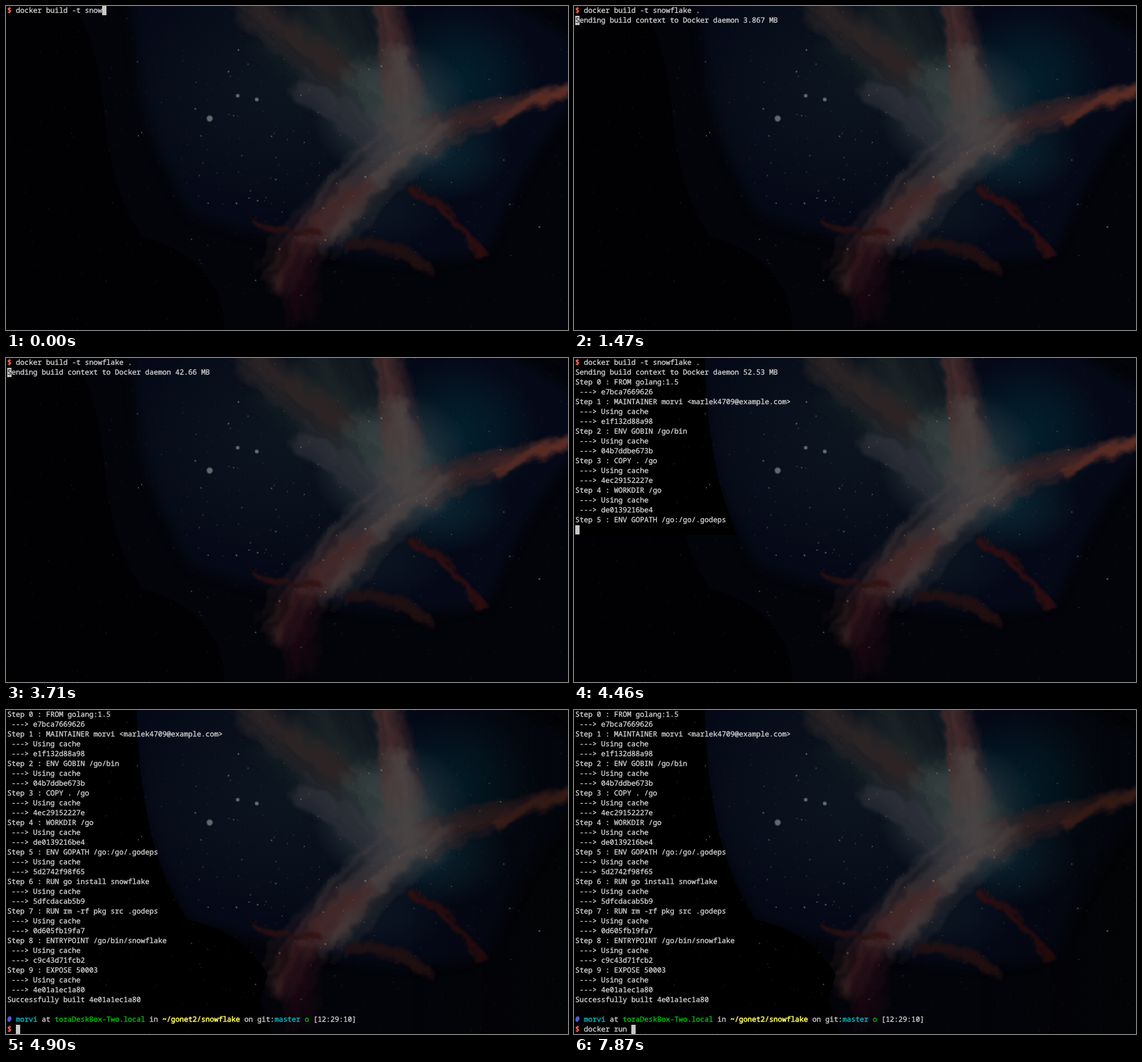
Write an HTML page that moves like this. It is 912 px wide and 527 px high and loops after 8000 ms.

```html
<!DOCTYPE html>
<html lang="en">
<head>
<meta charset="utf-8">
<title>Terminal build</title>
<style>
html, body { margin: 0; width: 100%; height: 100%; overflow: hidden; background: #000; }
svg { display: block; width: 100vw; height: 100vh; }
text {
  font: 11.6667px "Noto Sans Mono", "DejaVu Sans Mono", monospace;
  white-space: pre; text-rendering: geometricPrecision; color: #d2d2d2;
}
tspan { fill: currentColor; stroke: currentColor; stroke-width: .35px; }
.red { color: #ff6a58; }
.blue { color: #6c71ff; }
.cyan { color: #00c5cc; }
.green { color: #00c40c; }
.yellow { color: #fffb67; }
.red, .blue, .yellow { stroke-width: .6px; }
.under { color: #333; }
</style>
</head>
<body>
<svg viewBox="0 0 912 527" preserveAspectRatio="none">
  <defs>
    <filter id="soft" filterUnits="userSpaceOnUse" x="-60" y="-60" width="1032" height="647" color-interpolation-filters="sRGB">
      <feGaussianBlur stdDeviation="9"/>
    </filter>
    <filter id="cloud" filterUnits="userSpaceOnUse" x="-60" y="-60" width="1032" height="647" color-interpolation-filters="sRGB">
      <feGaussianBlur stdDeviation="2" result="blur"/>
      <feTurbulence type="fractalNoise" baseFrequency=".03" numOctaves="4" seed="4"/>
      <feDisplacementMap in="blur" scale="24" xChannelSelector="R" yChannelSelector="G"/>
    </filter>
    <linearGradient id="fade" gradientUnits="userSpaceOnUse" x1="660" x2="860">
      <stop stop-color="#030302" stop-opacity="0"/>
      <stop offset="1" stop-color="#030302" stop-opacity=".45"/>
    </linearGradient>
    <clipPath id="redrawn"><rect id="redrawnBox" width="912" height="0"/></clipPath>
  </defs>

  <rect width="912" height="527" fill="#010103"/>
  <path fill="#030409" d="M110,0 Q150,60 160,180 T220,375 Q350,410 355,527 H912 V0Z"/>
  <path fill="#050917" filter="url(#soft)" d="M202,-30 Q210,200 300,340 Q400,370 520,400 T780,400 Q850,230 930,150 V60 L780,-30Z"/>
  <g id="glows"></g>
  <g id="nebula" filter="url(#cloud)" fill="none" stroke-linecap="round"></g>
  <path clip-path="url(#redrawn)" fill="#000" opacity=".85" d="M0,0 H212 Q218,230 295,342 Q380,355 425,430 L412,470 L430,527 H0Z"/>
  <rect id="shade" x="660" width="252" height="527" fill="url(#fade)"/>
  <g id="stars"></g>
  <rect id="cursor" width="7" height="15" fill="#c8c8c8"/>
  <g id="screen"></g>
</svg>
<script>
const NS = "http://www.w3.org/2000/svg";
const LOOP = 8000, CELL = 7, ROW = 16, LEFT = 2;
const $ = id => document.getElementById(id);

let seed = 71;
const rnd = () => (seed = seed * 16807 % 2147483647) / 2147483647;
const spread = () => rnd() + rnd() - 1;

function add(parent, tag, attrs, text) {
  const el = document.createElementNS(NS, tag);
  for (const k in attrs) el.setAttribute(k, attrs[k]);
  if (text !== undefined) el.textContent = text;
  parent.appendChild(el);
  return el;
}

function glow(cx, cy, rx, ry, color) {
  const id = "g" + cx;
  const grad = add($("glows"), "radialGradient", { id });
  add(grad, "stop", { "stop-color": color });
  add(grad, "stop", { offset: .45, "stop-color": color, "stop-opacity": .65 });
  add(grad, "stop", { offset: 1, "stop-color": color, "stop-opacity": 0 });
  add($("glows"), "ellipse", { cx, cy, rx, ry, fill: `url(#${id})` });
}

// A bundle of faint strands along a curve, w0 wide at its start and w1 at its end
function plume([x0, y0], [cx, cy], [x1, y1], w0, w1, color) {
  const len = Math.hypot(x1 - x0, y1 - y0);
  const tx = (x1 - x0) / len, ty = (y1 - y0) / len, mean = (w0 + w1) / 2;
  for (let i = 0; i < 70; i++) {
    const u = spread();
    const point = (x, y, w, slide) => {
      const along = slide * rnd() * mean;
      return `${x - ty * u * w + tx * along},${y + tx * u * w + ty * along}`;
    };
    add($("nebula"), "path", {
      d: `M${point(x0, y0, w0, 1)} Q${point(cx, cy, mean, 0)} ${point(x1, y1, w1, -1)}`,
      stroke: color, "stroke-width": 1 + mean * .2, opacity: .1
    });
  }
}

function drawSky() {
  glow(450, 130, 260, 210, "#0c151f");
  glow(735, 120, 130, 120, "#03202d");
  glow(700, 240, 120, 80, "#0a2430");
  glow(590, 330, 130, 70, "#0b1621");
  glow(625, 170, 130, 120, "#354046");

  plume([470, -50], [530, 70], [630, 190], 140, 70, "#20292f");
  plume([375, -20], [460, 50], [570, 120], 45, 40, "#30282d");
  plume([465, 120], [540, 165], [630, 225], 25, 45, "#35363a");
  plume([560, 90], [620, 150], [690, 220], 50, 60, "#3b474b");
  plume([616, -25], [635, 60], [645, 165], 26, 38, "#523230");
  plume([636, 60], [642, 130], [645, 230], 20, 55, "#4c4744");
  plume([925, 133], [830, 160], [670, 215], 12, 40, "#4b2c2b");
  plume([925, 132], [860, 148], [790, 190], 6, 12, "#683229");
  plume([715, 185], [590, 260], [500, 390], 50, 55, "#4c4543");
  plume([590, 285], [495, 340], [430, 465], 35, 50, "#432628");
  plume([480, 380], [470, 440], [475, 520], 35, 30, "#1d0f13");
  plume([650, 298], [715, 315], [775, 410], 6, 5, "#39191b");
  plume([550, 385], [640, 380], [695, 435], 12, 14, "#2d1318");
  plume([400, 350], [450, 378], [510, 365], 6, 8, "#35171b");
}

function drawStars() {
  const star = (x, y, r, o) => add($("stars"), "circle", { cx: x, cy: y, r, fill: "#a5a9a9", opacity: o });
  for (let i = 0; i < 300; i++) star(rnd() * 912, rnd() * 527, .6, .25);
  for (let i = 0; i < 200; i++) star(480 + spread() * 400, 240 + spread() * 260, .6 + rnd() ** 4 * 1.2, .2 + rnd() * .3);
  for (const [x, y, r] of [[330.5, 183, 5.5], [376, 146, 3.3], [407, 152, 3.5]]) {
    star(x, y, r, .3);
    star(x, y, r * .75, .4);
  }
}

const build = "docker build -t snowflake";
const run = "docker run ";
const steps = [
  ["FROM golang:1.5", "e7bca7669626"],
  ["MAINTAINER morvi <marlek4709@example.com>", "e1f132d88a98"],
  ["ENV GOBIN /go/bin", "04b7ddbe673b"],
  ["COPY . /go", "4ec29152227e"],
  ["WORKDIR /go", "de0139216be4"],
  ["ENV GOPATH /go:/go/.godeps", "5d2742f98f65"],
  ["RUN go install snowflake", "5dfcdacab5b9"],
  ["RUN rm -rf pkg src .godeps", "0d605fb19fa7"],
  ["ENTRYPOINT /go/bin/snowflake", "c9c43d71fcb2"],
  ["EXPOSE 50003", "4e01a1ec1a80"]
];
const output = steps.flatMap(([cmd, id], i) => [
  `Step ${i} : ${cmd}`, ...(i ? [" ---> Using cache"] : []), ` ---> ${id}`
]).concat("Successfully built 4e01a1ec1a80");
const status = [
  ["# ", "blue"], ["morvi", "cyan"], [" at "], ["toraDeskBox-Two.local", "green"], [" in "],
  ["~/gonet2/snowflake", "yellow"], [" on git:"], ["master", "cyan"], [" "], ["o", "green"], [" [12:29:10]"]
];

// When each part begins, in ms
const TYPE = 140, DOT = 890, ENTER = 1180, SEND = 1470, SENT = 4160, PRINT = 4310, DONE = 4900, RUN = 6850;

// Refreshes since start, up to max
const ticks = (t, start, max, step = 146) =>
  Math.max(0, Math.min(max, Math.floor((t - start) / step) + 1));
const prompt = text => [["$ ", "red"], [text]];

function sending(t) {
  const mb = t < SENT ? 3.867 + 2.586 * (ticks(t, SEND, 18, 149) - 1) : 52.53;
  return `Sending build context to Docker daemon ${mb.toPrecision(4)} MB`;
}

function typedBuild(t) {
  const left = 5 - Math.round(ticks(t, TYPE, 4) * 5 / 4);
  return build.slice(0, build.length - left) + " .".slice(0, ticks(t, DOT, 2));
}

// Screen contents, scroll offset and cursor cell at time t
function stateAt(t) {
  const typed = typedBuild(t);
  const rows = [prompt(typed)];
  if (t < ENTER) return { rows, top: 0, row: 0, col: typed.length + 2 };
  if (t < SEND) return { rows, top: 0, row: 1, col: 0 };
  const line = sending(t);
  if (t < PRINT) {
    rows.push([[line[0], "under"], [line.slice(1)]]);
    return { rows, top: 0, row: 1, col: 0 };
  }
  const printed = Math.floor(output.length * ticks(t, PRINT, 4) / 4);
  rows.push([[line]], ...output.slice(0, printed).map(s => [[s]]));
  if (t < DONE) return { rows, top: 0, row: rows.length, col: 0 };
  const n = Math.round(run.length * ticks(t, RUN, 8, 145.5) / 8);
  rows.push([[""]], status, prompt(run.slice(0, n)));
  return { rows, top: 2, row: rows.length - 1, col: n + 2 };
}

let shown = "";
function render(t) {
  const state = stateAt(t), key = JSON.stringify(state);
  if (key === shown) return;
  shown = key;
  const { rows, top, row, col } = state;
  const screen = $("screen");
  screen.textContent = "";
  rows.slice(top).forEach((spans, i) => {
    const line = add(screen, "text", { x: LEFT, y: i * ROW + 11 });
    for (const [text, cls] of spans) add(line, "tspan", cls ? { class: cls } : {}, text);
  });
  $("cursor").setAttribute("x", LEFT + col * CELL);
  $("cursor").setAttribute("y", (row - top) * ROW);
  $("redrawnBox").setAttribute("height", row > 1 ? (row + 1) * ROW : 0);
  $("shade").style.display = top ? "" : "none";
}

drawSky();
drawStars();
const start = performance.now();
function frame() {
  render((performance.now() - start) % LOOP);
  requestAnimationFrame(frame);
}
frame();
</script>
</body>
</html>
```
